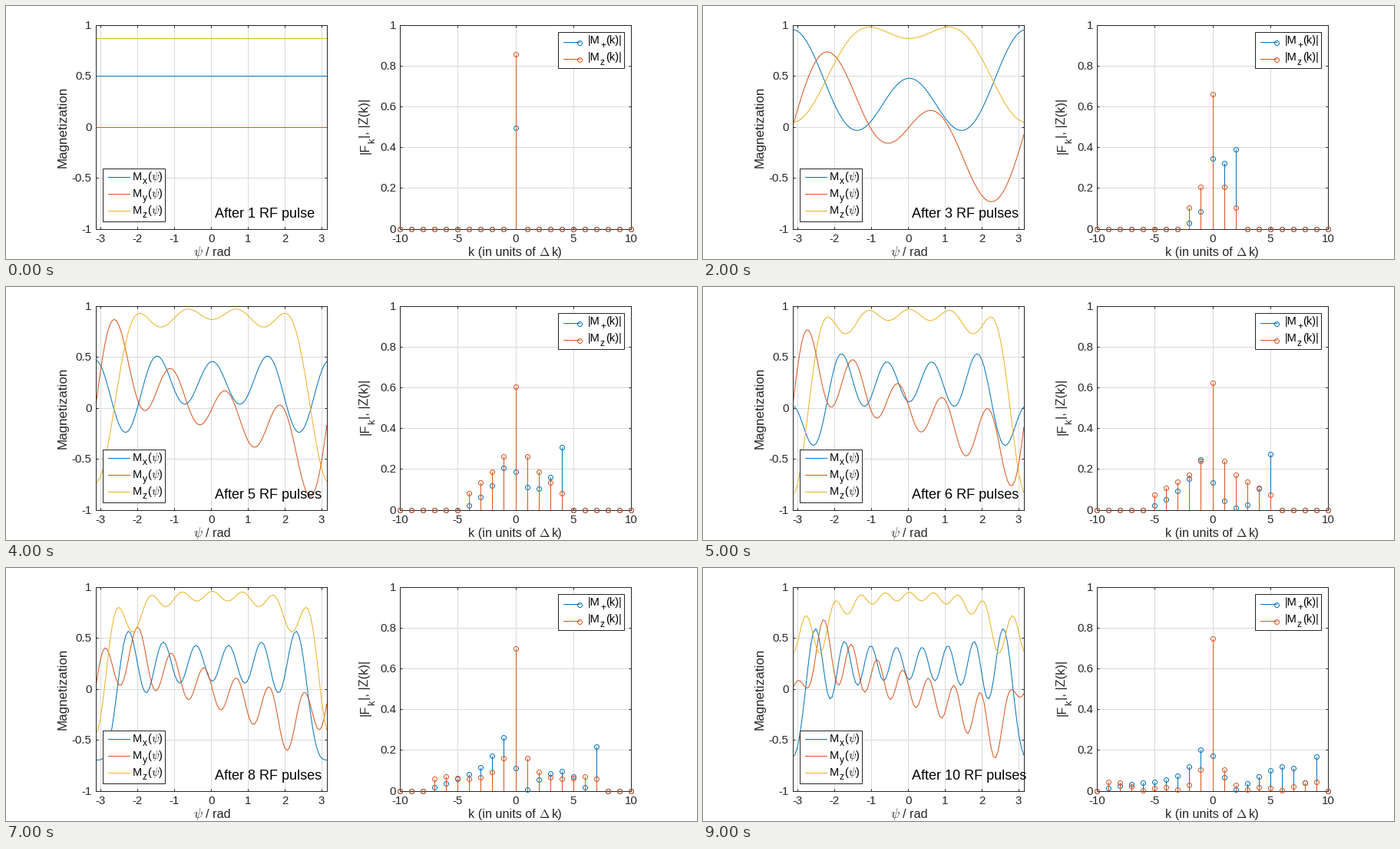
These frames come from a looping animation (900 px wide and 330 px high, 10 s). A matplotlib script:

```python
import numpy as np
import matplotlib as mpl
import matplotlib.pyplot as plt
from matplotlib.animation import FuncAnimation
from matplotlib.patches import Rectangle

W, H, DPI = 900, 330, 100
PX = 72 / DPI
BLUE, RED, GOLD, INK = "#0072BD", "#D95319", "#EDB120", "#262626"
GRID = "#dadada"
TOP, BOTTOM = 24.6, 290.6
PULSES, N = 10, 100
FLIP = np.radians(30)
E1, E2 = np.exp(-0.005), np.exp(-0.05)  # relaxation over one TR

mpl.rcParams["font.family"] = "Liberation Sans"
mpl.rcParams["mathtext.fontset"] = "cm"

fig = plt.figure(figsize=(W / DPI, H / DPI), dpi=DPI, facecolor="white")


def simulate():
    """Magnetization over the dephasing angle just after each pulse."""
    # pulse phases alternate, so the receiver frame turns by pi per TR
    turn = E2 * np.exp(2j * np.pi * np.arange(N) / N)
    m, z = np.zeros(N, complex), np.ones(N)
    c, s = np.cos(FLIP), np.sin(FLIP)
    states = []
    for _ in range(PULSES):
        x = c * m.real + s * z
        z = c * z - s * m.real
        m = x + 1j * m.imag
        states.append((m, z))
        m, z = m * turn, E1 * z + 1 - E1
    return states


def spectrum(v, k):
    grid = np.arange(N) / N - 0.5
    return np.abs(np.exp(-2j * np.pi * np.outer(k, grid)) @ v) / (N + 1)


def label(x, y, s, size, ha="left", color=INK, **kw):
    return fig.text(x / W, 1 - y / H, s, fontsize=size * PX, ha=ha,
                    va="baseline", color=color, **kw)


def upright(x, y, s, size, ha="left"):
    label(x, y, s, size, ha, rotation=90, rotation_mode="anchor")


def key_text(x, y, s, size=14.5):
    label(x, y, s, size, color="black", zorder=6)


def key_line(x0, x1, y, color):
    fig.add_artist(plt.Line2D([x0 / W, x1 / W], [1 - y / H] * 2, color=color,
                              lw=PX, zorder=6))


def key_box(x, y, w, h):
    fig.add_artist(Rectangle((x / W, 1 - (y + h) / H), w / W, h / H, fc="white",
                             ec=INK, lw=PX, zorder=5,
                             transform=fig.transFigure))


def panel(x0, x1, xlim, ylim, xticks, yticks):
    ax = fig.add_axes([x0 / W, 1 - BOTTOM / H, (x1 - x0) / W, (BOTTOM - TOP) / H])
    ax.set(xlim=xlim, ylim=ylim, xticks=xticks, yticks=yticks)
    ax.grid(True, color=GRID, lw=PX)
    ax.set_axisbelow(True)
    ax.tick_params(direction="in", length=3 * PX, width=PX, color=INK,
                   top=True, right=True, labelbottom=False, labelleft=False)
    for side in ax.spines.values():
        side.set(color=INK, linewidth=PX)
    for t in xticks:
        x = x0 + (t - xlim[0]) / (xlim[1] - xlim[0]) * (x1 - x0)
        label(x, 308, f"{t:g}", 15, "center")
    for t in yticks:
        y = BOTTOM - (t - ylim[0]) / (ylim[1] - ylim[0]) * (BOTTOM - TOP)
        label(x0 - 5, y + 5, f"{t:g}", 15, "right")
    return ax


psi = np.linspace(-np.pi, np.pi, N)
ks = np.arange(-10, 11)
states = simulate()

left = panel(116.6, 417.8, (-np.pi, np.pi), (-1, 1), range(-3, 4),
             [-1, -0.5, 0, 0.5, 1])
right = panel(512.92, 814.12, (-10, 10), (0, 1), range(-10, 11, 5),
              [0, 0.2, 0.4, 0.6, 0.8, 1])

curves = [left.plot([], [], color=c, lw=PX)[0] for c in (BLUE, RED, GOLD)]
stems = []
for i, color in enumerate((BLUE, RED)):
    bars = right.vlines(ks, 0, 0, color=color, lw=PX, zorder=3 + 2 * i)
    dots, = right.plot([], [], "o", ms=6 * PX, mfc="none", mec=color, mew=PX,
                       clip_on=False, zorder=4 + 2 * i)
    stems.append((bars, dots))

# axis titles
upright(79, 158, "Magnetization", 17, "center")
label(244, 326, r"$\psi$", 17)
label(260, 326, "/ rad", 16.3)
label(602, 326, "k (in units of", 16.3)
label(694, 326, r"$\Delta$", 16)
label(711, 326, "k)", 16.3)
upright(472, 193, "|F", 16.3)
upright(480, 179, "k", 13)
upright(472, 172.5, "|, |Z(k)|", 16.3)

# legends
key_box(126.2, 212.2, 81, 69)
for y, sub, color in ((223, "x", BLUE), (245, "y", RED), (267, "z", GOLD)):
    key_line(133, 161, y, color)
    key_text(165, y + 4, "M")
    key_text(177.5, y + 9, sub, 12)
    key_text(184, y + 4, "(")
    key_text(189, y + 4, r"$\psi$")
    key_text(199, y + 4, ")")

key_box(719.2, 34.2, 86, 47)
for y, sub, color in ((45, "+", BLUE), (67, "z", RED)):
    key_line(726, 747, y + 2, color)
    fig.add_artist(plt.Line2D([746.5 / W], [1 - (y + 2.5) / H], marker="o",
                              ms=6 * PX, mfc="none", mec=color, mew=PX, zorder=6))
    key_text(758, y + 4.5, "|M")
    key_text(774, y + 10, sub, 12)
    key_text(781, y + 4.5, "(k)|")

note = label(272, 276, "", 18, color="black", zorder=7)


def draw(i):
    m, z = states[i]
    for line, v in zip(curves, (m.real, m.imag, z)):
        line.set_data(psi, v)
    for (bars, dots), v in zip(stems, (m, z)):
        a = spectrum(v, ks)
        bars.set_segments([[(k, 0), (k, h)] for k, h in zip(ks, a)])
        dots.set_data(ks, a)
    note.set_text(f"After {i + 1} RF pulse{'s' if i else ''}")
    return [*curves, note]


anim = FuncAnimation(fig, draw, frames=PULSES, interval=1000, repeat=True)
plt.show()
```
